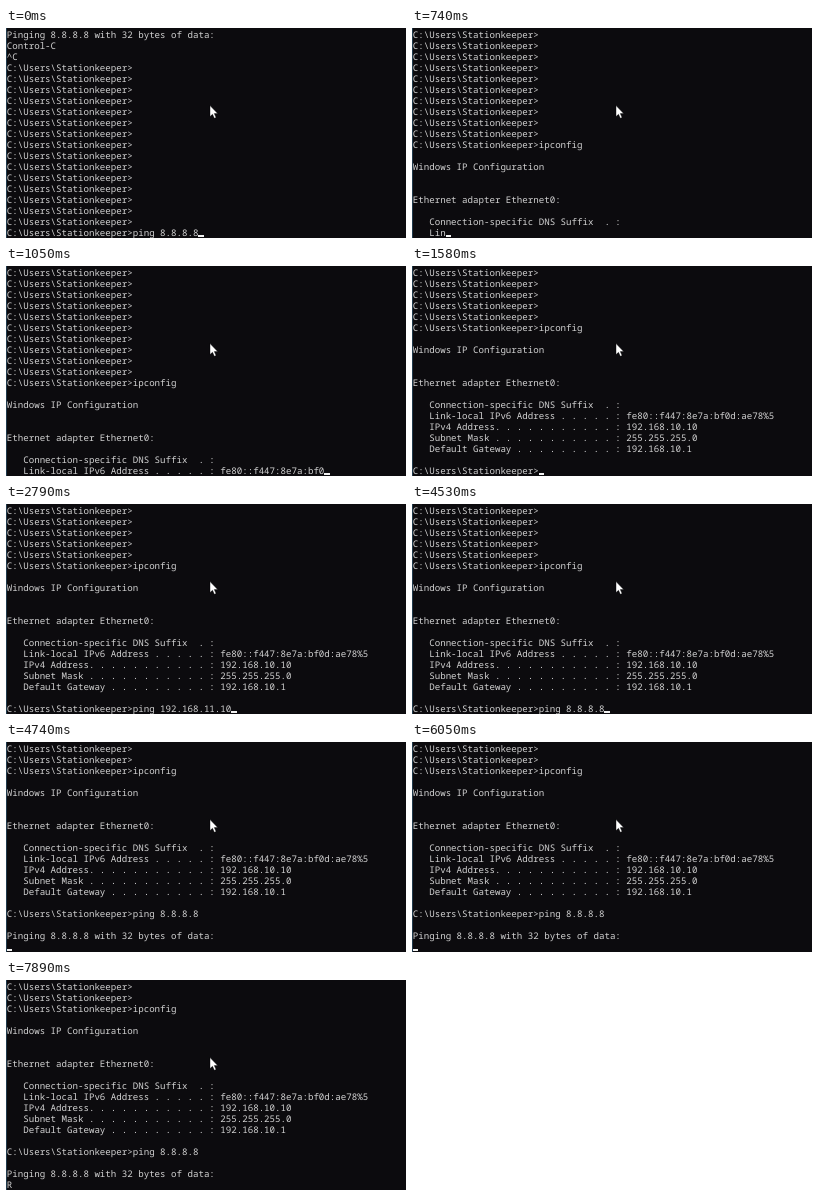
Recreate the animation shown at these times as an HTML page. Size 400x210 px, loop 8000 ms.

```html
<!DOCTYPE html>
<html lang="en">
<head>
<meta charset="utf-8">
<title>Console</title>
<style>
  html, body { margin: 0; width: 100%; height: 100%; overflow: hidden; background: #0c0b0e; }
  #console {
    position: absolute; left: 0; top: 0; width: 400px; height: 210px; overflow: hidden;
    font: 9.15px/11px "Noto Sans Mono", monospace;
    font-variant-ligatures: none;
    text-rendering: geometricPrecision;
    color: #d2d2d2;
  }
  #console::before { content: ""; position: absolute; left: 0; top: 0; width: 1px; height: 100%; background: #203a4c; }
  #text { position: absolute; left: .8px; top: 0; }
  #screen { position: absolute; left: 0; top: 1px; margin: 0; font: inherit; white-space: pre; }
  #caret { position: absolute; top: 207px; width: 5.5px; height: 2.4px; background: #f2f2f2; }
  svg { position: absolute; left: 0; top: 0; }
</style>
</head>
<body>
<div id="console">
  <div id="text">
    <pre id="screen"></pre>
    <div id="caret"></div>
  </div>
  <svg width="400" height="210">
    <path d="M204 77.6v11l2.5-2.3 1.8 4 1.8-.8-1.8-3.9h3.4z" fill="#fff" stroke="#000" stroke-width=".4"/>
  </svg>
</div>
<script>
const LOOP = 8000, ROWS = 19;
const PROMPT = "C:\\Users\\Stationkeeper>";
const PINGING = "Pinging 8.8.8.8 with 32 bytes of data:\n";
const HISTORY = PINGING + "Control-C\n^C\n" + (PROMPT + "\n").repeat(15) + PROMPT;

const REPORT = `

Windows IP Configuration


Ethernet adapter Ethernet0:

   Connection-specific DNS Suffix  . :
   Link-local IPv6 Address . . . . . : fe80::f447:8e7a:bf0d:ae78%5
   IPv4 Address. . . . . . . . . . . : 192.168.10.10
   Subnet Mask . . . . . . . . . . . : 255.255.255.0
   Default Gateway . . . . . . . . . : 192.168.10.1

`;
const PAUSE_AT = REPORT.indexOf("d:ae78");
const STREAM = { start: 210, end: 1000, steps: 15 };

// Spans in which the blinking caret is lit
const CARET_ON = [[0, 1790], [2790, 2840], [3210, 3840], [4530, 5420], [6000, 6950], [7790, 7890]];

function streamed(t) {
  const { start, end, steps } = STREAM;
  const step = Math.floor((t - start) / (end - start) * steps + 1e-6);
  return REPORT.slice(0, Math.round(PAUSE_AT * Math.min(1, step / steps)));
}

function bufferAt(t) {
  if (t < 210) return HISTORY + "ping 8.8.8.8";
  const asked = HISTORY + "ipconfig";
  if (t < 1580) return asked + streamed(t);
  const ready = asked + REPORT + PROMPT;
  if (t < 2790) return ready;
  if (t < 3840) return ready + "ping 192.168.11.10";
  const ping = ready + "ping 8.8.8.8";
  if (t < 4740) return ping;
  return ping + "\n\n" + PINGING + (t < 7890 ? "" : "R");
}

const screenEl = document.getElementById("screen");
const caretEl = document.getElementById("caret");
let shown = "";

function draw() {
  const t = performance.now() % LOOP;
  const lines = bufferAt(t).split("\n").slice(-ROWS);
  const text = lines.join("\n");
  if (text !== shown) screenEl.textContent = shown = text;
  caretEl.style.left = lines[ROWS - 1].length + "ch";
  caretEl.style.visibility = CARET_ON.some(([a, b]) => t >= a && t < b) ? "visible" : "hidden";
  requestAnimationFrame(draw);
}
draw();
</script>
</body>
</html>
```
